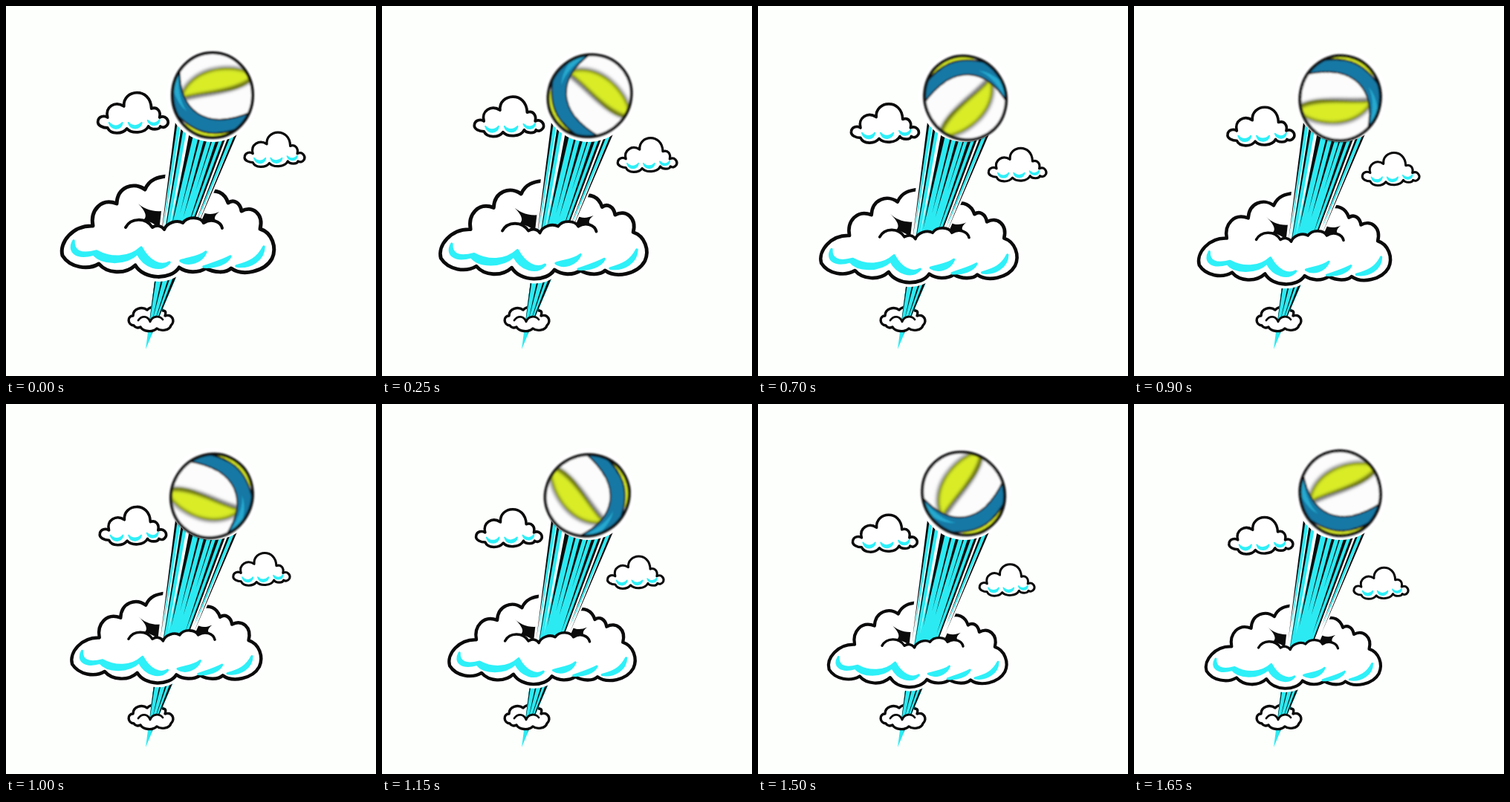
These frames come from a looping animation (498x498 px, 1700 ms). An HTML page:

```html
<!DOCTYPE html>
<html lang="en">
<head>
<meta charset="utf-8">
<title>Ball above the clouds</title>
<style>
  html, body { margin: 0; width: 100%; height: 100%; overflow: hidden; background: #fdfffc; }
  svg { display: block; width: 498px; height: 498px; }
  .line { fill: none; stroke: #0b0b0b; stroke-linejoin: round; stroke-linecap: round; }
  .white { fill: #fff; }
  .black { fill: #0b0b0b; }
  .cyan { fill: #2ceaf2; }
  .shade { fill: #2ef0f8; stroke: #2ef0f8; stroke-width: 3.5; stroke-linejoin: round; }
  .halo { fill: #fff; stroke: #fff; stroke-width: 13; stroke-linejoin: round; }
</style>
</head>
<body>
<svg viewBox="0 0 498 498">
  <defs>
    <clipPath id="aboveRim"><path d="M0 0H498V330H0Z"/></clipPath>
    <clipPath id="abovePuff"><path d="M0 366H498V422H0Z"/></clipPath>
    <clipPath id="ballEdge"><ellipse rx="54" ry="57"/></clipPath>
    <filter id="soft" x="-30%" y="-60%" width="160%" height="220%"><feGaussianBlur stdDeviation="2"/></filter>
    <filter id="slightlySoft"><feGaussianBlur stdDeviation=".8"/></filter>
    <path id="cloudShape" d="M125 347C110 356 86 352 76 336C71 318 90 295 117 296C113 275 128 258 149 266C150 243 172 236 187 247C193 233 205 230 217 229L272 250C282 247 294 250 299 265C306 260 315 264 317 276C332 268 347 280 342 300C358 305 365 325 358 340C348 358 318 364 303 353C296 360 280 359 269 353C258 360 243 359 233 352C222 369 186 369 174 349C160 362 136 360 125 347Z"/>
    <path id="rim" d="M161 298C168 285 188 284 197 298C203 294 210 296 213 301C216 292 230 287 238 292C245 282 262 284 266 292C276 285 289 290 291 299"/>
    <g id="smallCloud">
      <path class="line" style="fill:#fff" stroke-width="3.8" d="M-34 20C-40 20-48 17-47 11C-46 4-38 3-34 6C-38-8-24-17-12-9C-14-32 24-36 25-6C33-9 38-2 36 6C44 2 49 10 47 15C44 20 40 20 37 18C36 23 24 23 21 18C16 28-2 28-8 21C-14 29-30 29-34 20Z"/>
      <path class="shade" style="stroke-width:2" d="M-32 13c5 6 13 6 18 0c-1 10-15 11-18 0zM-6 13c5 6 13 5 18 0c-1 9-15 11-18 0zM20 10c5 5 12 5 16-1c0 9-13 10-16 1z"/>
    </g>
    <g id="upperTrail"></g>
    <g id="lowerTrail"></g>
  </defs>

  <use href="#lowerTrail"/>
  <path class="line" style="fill:#fff" stroke-width="3.4" d="M172 430C163 429 163 417 171 417C171 407 183 404 190 409C196 403 208 403 211 410C216 410 215 414 214 417C224 414 228 424 222 430C220 437 208 438 203 434C197 440 184 438 181 432C178 434 174 433 172 430Z"/>
  <use href="#lowerTrail" clip-path="url(#abovePuff)"/>
  <path class="white" d="M178 424C183 416 191 417 194 424C197 416 207 417 211 422L205 431H185Z"/>
  <path class="line" stroke-width="2.8" d="M178 423C183 416 191 417 194 425C197 416 207 417 211 422"/>

  <g class="bigCloud">
    <use href="#cloudShape" class="halo"/>
    <use href="#cloudShape" class="line" stroke-width="5"/>
    <path class="black" d="M176 264C184 273 200 279 216 275L214 303C204 298 198 289 183 289C193 284 186 274 176 264ZM250 280L262 276C270 281 278 281 287 277C277 285 280 290 293 299C280 291 268 291 248 300Z"/>
  </g>
  <use href="#upperTrail" clip-path="url(#aboveRim)"/>
  <g class="bigCloud">
    <use href="#rim" class="white"/>
    <path class="white" d="M161 298H291L280 338H175Z"/>
    <use href="#rim" class="line" stroke-width="4"/>
    <path class="shade" d="M91 316C83 330 94 341 118 334C128 347 160 349 177 333C186 351 208 359 220 345C208 352 192 344 182 325C165 341 140 340 122 330C100 336 90 330 91 316ZM235 343C246 350 263 345 269 331C261 338 248 339 235 343ZM266 351C282 352 297 347 302 337C291 343 280 346 266 351ZM310 350C329 353 347 341 347 324C339 340 328 345 310 350Z"/>
  </g>

  <use href="#smallCloud" id="leftCloud"/>
  <use href="#smallCloud" id="rightCloud"/>

  <circle class="white" cx="278" cy="121" r="62"/>
  <g id="ball" filter="url(#slightlySoft)">
    <g clip-path="url(#ballEdge)">
      <ellipse rx="54" ry="57" fill="#fcfcfc"/>
      <path fill="#d9ec28" d="M-44 6C-36-30 10-46 48-32L50-18C30 0-15-6-44 6ZM-60 38H60V60H-60Z"/>
      <g class="line" filter="url(#soft)">
        <path stroke-width="3" opacity=".7" d="M-44 6C-36-30 10-46 48-32"/>
        <path stroke-width="4" opacity=".8" d="M-36 4C-10-3 30-4 52-21"/>
      </g>
      <path class="line" style="fill:#1278a4" stroke-width="2" d="M-44-34C-46 20-10 50 54 22L46 40C0 62-30 52-62 10Z"/>
      <path fill="#25a9cf" d="M-46-32C-47-4-42 12-34 22C-46 14-54-6-54-16Z"/>
    </g>
    <ellipse class="line" rx="54" ry="57" stroke-width="4"/>
  </g>
</svg>
<script>
const LOOP = 1700, STEP = 50, LAST = LOOP - STEP;
const $ = id => document.getElementById(id);
const mix = (a, b, k) => a + (b - a) * k;

// A stripe of the trail: starts between shares a and b of the width, points at the apex, ends at y = end.
const apex = [188, 462], topY = 140;
function stripe(group, color, a, b, end = apex[1]) {
  const x = u => mix(230, 324, u);
  const tip = mix(x((a + b) / 2), apex[0], (end - topY) / (apex[1] - topY));
  const path = document.createElementNS('http://www.w3.org/2000/svg', 'path');
  path.setAttribute('class', color);
  path.setAttribute('d', `M${x(a)} ${topY}H${x(b)}L${tip} ${end}Z`);
  $(group).append(path);
}

stripe('upperTrail', 'white', -.06, 1.04);
stripe('upperTrail', 'cyan', .1, .84);
for (const [a, b, end] of [[.02, .09, 310], [.88, .98, 300]]) stripe('upperTrail', 'cyan', a, b, end);
stripe('upperTrail', 'white', .19, .26, 310);
for (const [a, b, end] of [[0, .035, 320], [.1, .14, 340], [.24, .32, 300], [.4, .44, 280],
  [.5, .56, 285], [.62, .65, 250], [.7, .76, 310], [.81, .85], [.88, .92, 300], [.97, 1.01, 310]])
  stripe('upperTrail', 'black', a, b, end);

stripe('lowerTrail', 'cyan', 0, 1);
for (const [a, b, end] of [[0, .07, 440], [.3, .42, 425], [.62, .74, 430], [.85, 1, 445]])
  stripe('lowerTrail', 'black', a, b, end);

function place(id, x, y, scale) {
  $(id).setAttribute('transform', `translate(${x} ${y}) scale(${scale})`);
}

function draw(now) {
  const t = Math.floor(now % LOOP / STEP) * STEP;
  const k = t / LAST;
  const turn = t / LOOP * 2 * Math.PI;

  for (const part of document.querySelectorAll('.bigCloud'))
    part.setAttribute('transform', `translate(198 468) scale(${mix(1, .823, k)}) translate(-198 -468)`);
  place('leftCloud', 170.7, mix(144, 177.5, k), mix(1, .91, k));
  place('rightCloud', mix(361.3, 332.3, k), mix(193.5, 241.5, k), mix(.855, .775, k));

  const x = 278 + 2 * Math.sin(turn), y = 122 - 2 * Math.cos(turn);
  $('ball').setAttribute('transform', `translate(${x} ${y}) rotate(${t / LOOP * 360})`);
  requestAnimationFrame(() => draw(performance.now()));
}
draw(0);
</script>
</body>
</html>
```
